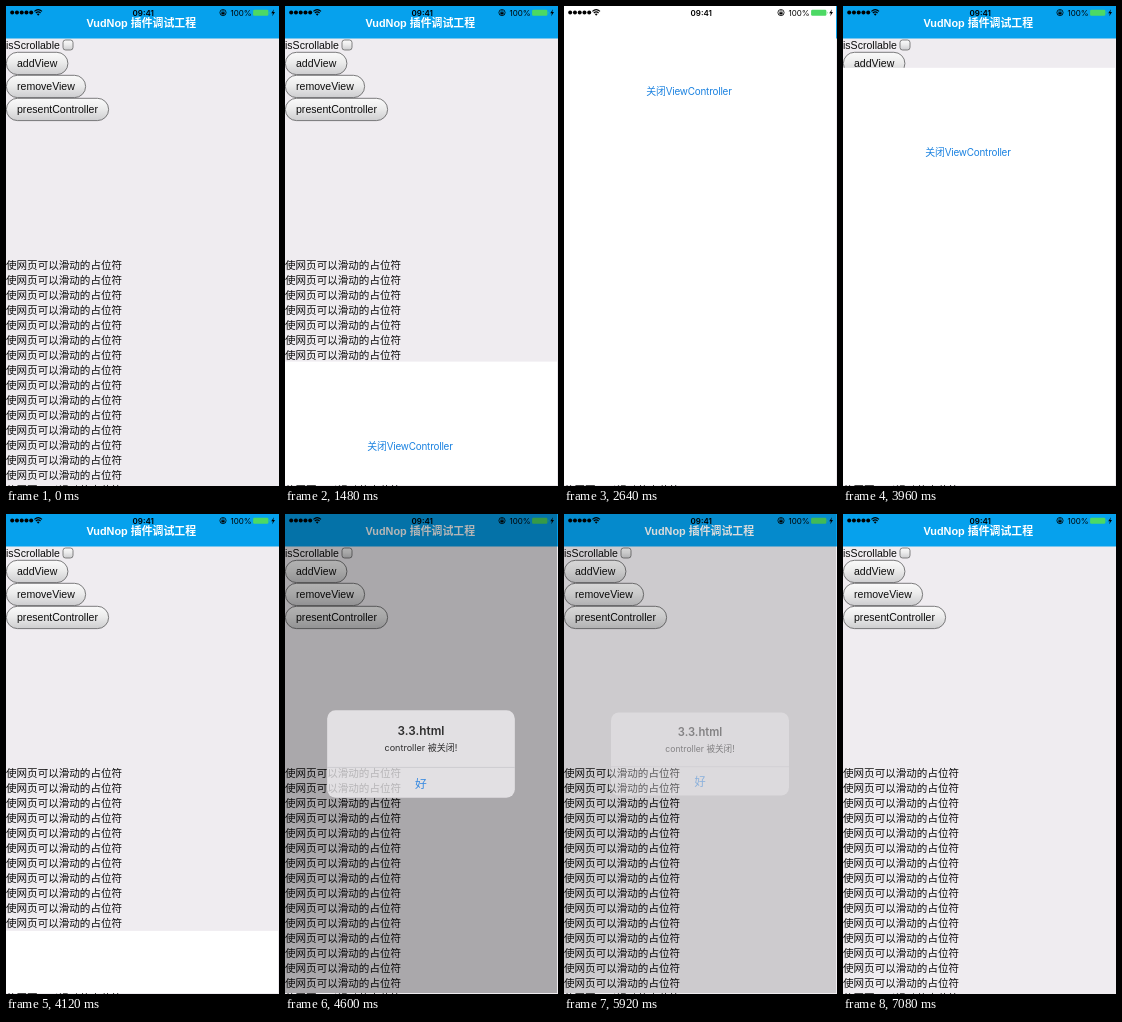
These frames come from a looping animation (273x480 px, 7120 ms). An HTML page:

```html
<!DOCTYPE html>
<html lang="zh-CN">
<head>
<meta charset="utf-8">
<title>插件调试工程</title>
<style>
html, body { margin: 0; width: 100%; height: 100%; overflow: hidden; background: #fff; }
svg { display: block; width: 100%; height: 100%; }
.web { font: 10.55px "Liberation Sans", "Noto Sans CJK SC", sans-serif; fill: #0c0c0c; }
.ios { font-family: Inter, "Noto Sans CJK SC", sans-serif; }
.mid { text-anchor: middle; }
</style>
</head>
<body>
<svg viewBox="0 0 273 480" xmlns="http://www.w3.org/2000/svg">
  <defs>
    <linearGradient id="pill" x1="0" y1="0" x2="0" y2="1">
      <stop offset="0" stop-color="#fafafa"/>
      <stop offset=".45" stop-color="#ececec"/>
      <stop offset="1" stop-color="#cdcdcf"/>
    </linearGradient>
    <clipPath id="screen"><rect width="272" height="479"/></clipPath>
  </defs>

  <rect width="273" height="480" fill="#efecf0"/>
  <rect width="273" height="32.5" fill="#06a1ed"/>
  <text class="web mid" x="135.3" y="20.5" style="font-size:10.9px;font-weight:700;fill:#fff">VudNop 插件调试工程</text>
  <g class="web" id="page">
    <text x="0" y="42.5">isScrollable</text>
    <rect x="57" y="34" width="10" height="10" rx="2.6" fill="url(#pill)" stroke="#666" stroke-width=".8"/>
  </g>

  <g clip-path="url(#screen)">
    <g id="sheet">
      <rect width="273" height="480" fill="#fff"/>
      <text class="ios mid" x="125" y="88.6" font-size="9.9" letter-spacing="-.02em" fill="#1b82e0">关闭ViewController</text>
    </g>
  </g>

  <g class="ios" id="status" font-size="8">
    <g fill="none" stroke="#000" stroke-width="1.2">
      <path d="M28.4 5.4Q32.2 2 36 5.4M29.8 7Q32.2 4.9 34.6 7"/>
      <circle cx="217" cy="6.6" r="3.1" stroke-width=".8"/>
      <path d="M216 6.6V5.6a1 1 0 0 1 2 0V6.6" stroke-width=".6"/>
    </g>
    <path d="M30.8 8.1Q32.2 7 33.6 8.1L32.2 9.7Z"/>
    <rect x="215.4" y="6.3" width="3.2" height="2.2"/>
    <text class="mid" x="137.2" y="9.6" font-weight="600">09:41</text>
    <text class="mid" x="235" y="9.6">100%</text>
    <rect x="247.1" y="3.7" width="15.3" height="6.1" rx="1.3" fill="#4cd964"/>
    <path d="M263.3 5.4q1.2 1.3 0 2.6z" fill="#4cd964"/>
    <path d="M268 3.2L265.2 7.2H266.9L266.2 10.2L269 6.1H267.3Z"/>
  </g>

  <rect id="dim" width="272" height="479" fill="#000"/>
  <g id="alert" class="ios mid">
    <rect x="47" y="198.5" width="178" height="83" rx="8" fill="#f7f5f8"/>
    <path d="M47 252.7H225" stroke="#cdccd0" stroke-width=".6"/>
    <text x="136" y="222" font-size="11.2" font-weight="600">3.3.html</text>
    <text x="136" y="237.6" font-size="8.6">controller 被关闭!</text>
    <text x="136" y="272" font-size="11.2" fill="#1180f5">好</text>
  </g>
</svg>
<script>
const LOOP = 7120, H = 480, RATE = 0.01826;
const PRESENT = 1427, DISMISS = 3927, ALERT_IN = 4460, ALERT_OUT = 5801;
const $ = id => document.getElementById(id);
const page = $('page'), sheet = $('sheet'), dim = $('dim'), alertBox = $('alert');

function add(parent, tag, attrs, text = '') {
  const el = document.createElementNS('http://www.w3.org/2000/svg', tag);
  for (const k in attrs) el.setAttribute(k, attrs[k]);
  el.textContent = text;
  parent.appendChild(el);
}

[['addView', 62.3], ['removeView', 80], ['presentController', 103]].forEach(([label, w], i) => {
  const y = 45.9 + i * 23;
  add(page, 'rect', {
    x: 0.4, y: y + 0.4, width: w - 0.8, height: 22.3, rx: 11.1,
    fill: 'url(#pill)', stroke: '#5c5c5e', 'stroke-width': 0.8
  });
  add(page, 'text', { x: 11, y: y + 15.4 }, label);
});
for (let i = 0; i < 16; i++) add(page, 'text', { x: 0, y: 263 + i * 15 }, '使网页可以滑动的占位符');
for (let i = 0; i < 5; i++) add($('status'), 'circle', { cx: 6.2 + i * 4.75, cy: 6.6, r: 2 });

// Critically damped spring: share of the way still left at time t.
function left(t, start) {
  const s = Math.max(0, t - start) * RATE;
  return (1 + s) * Math.exp(-s);
}

function draw(t) {
  const y = t < DISMISS ? left(t, PRESENT) : 1 - left(t, DISMISS);
  sheet.setAttribute('transform', `translate(0 ${H * y})`);
  sheet.style.display = y > 0.999 ? 'none' : '';

  const grow = left(t, ALERT_IN);
  const shown = t < ALERT_OUT ? 1 - grow : left(t, ALERT_OUT);
  dim.setAttribute('opacity', 0.4 * shown);
  alertBox.setAttribute('opacity', shown);
  alertBox.setAttribute('transform', `translate(136 240) scale(${1 + 0.2 * grow}) translate(-136 -240)`);
}

const begin = performance.now();
function tick() {
  draw((performance.now() - begin) % LOOP);
  requestAnimationFrame(tick);
}
tick();
</script>
</body>
</html>
```
